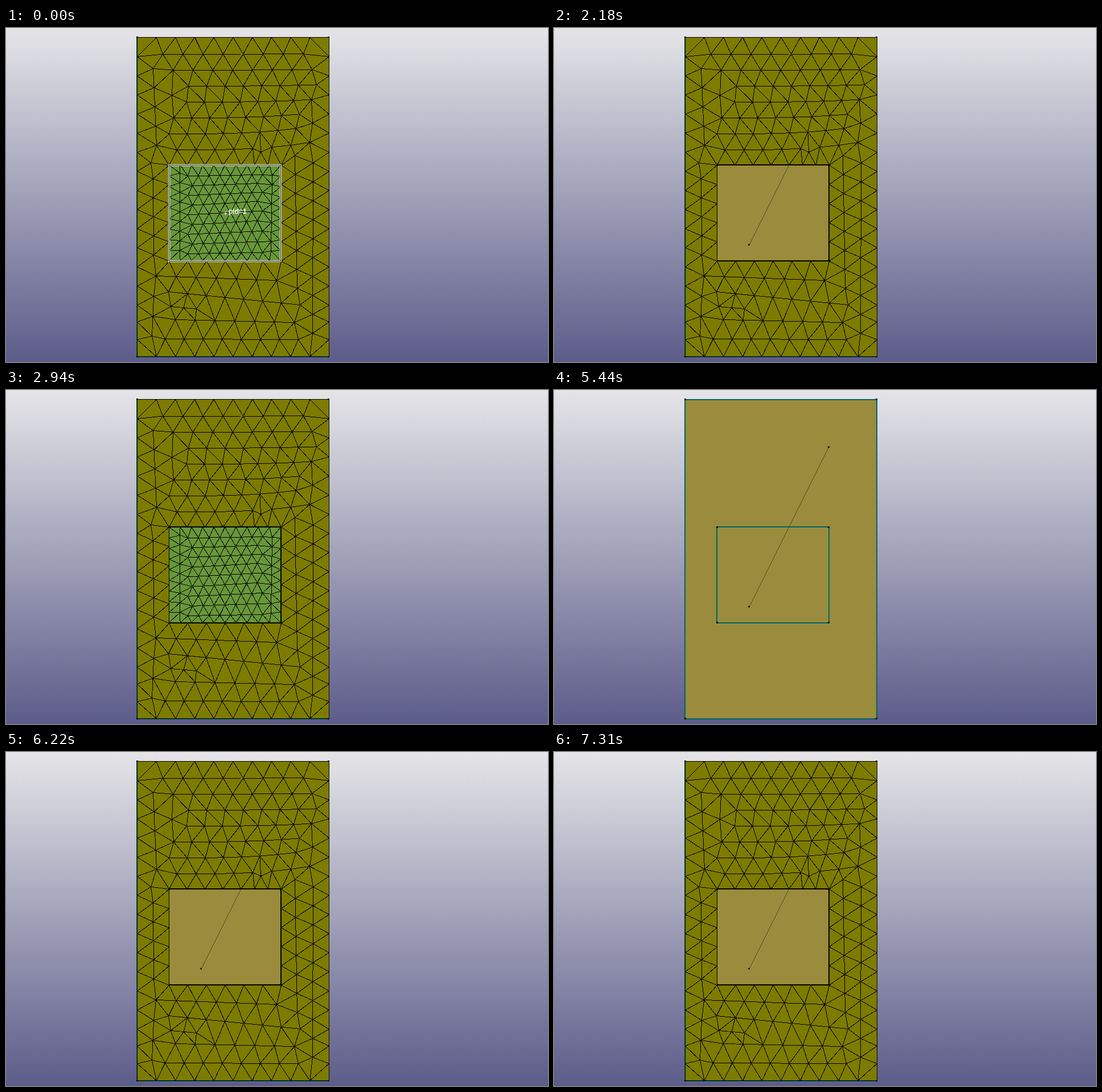
These frames come from a looping animation (952 px wide and 588 px high, 8000 ms). An HTML page:

```html
<!DOCTYPE html>
<html lang="en">
<head>
<meta charset="utf-8">
<title>Mesh parts</title>
<style>
  html, body { margin: 0; width: 100%; height: 100%; overflow: hidden; }
  svg { display: block; width: 952px; height: 588px; background: linear-gradient(#e5e5e8, #5c5c8a); }
  .wire { fill: none; stroke: #000; shape-rendering: crispEdges; }
  .edge { fill: none; stroke: #006466; stroke-width: 2; shape-rendering: crispEdges; }
  .white { stroke: #fff; }
  text { font: bold 12px "Liberation Sans", Arial, sans-serif; fill: #fff; }
</style>
</head>
<body>
<svg viewBox="0 0 952 588">
  <g id="geometry">
    <rect x="230" y="16" width="337" height="563" fill="#9a8c3c"/>
    <path d="M343 382L482.500 100.500" stroke="#4f4a1e"/>
    <rect class="edge" x="230" y="17" width="337" height="562"/>
    <rect class="edge" x="286" y="241" width="197" height="169"/>
  </g>
  <g id="plate">
    <path fill="#7d7b00" fill-rule="evenodd" d="M230 16H567V579H230ZM287 241V409H482V241Z"/>
    <path class="wire mesh"/>
    <rect class="wire" x="230.500" y="16.500" width="337" height="562"/>
    <path class="wire" d="M286.500 240.500V409.500H482.500V240.500Z"/>
  </g>
  <g id="block">
    <rect x="286" y="241" width="197" height="169" fill="#68973a"/>
    <path class="wire mesh"/>
    <rect class="wire" x="286.500" y="241.500" width="196" height="168"/>
  </g>
  <g id="label">
    <rect class="wire white" x="286.500" y="241.500" width="196" height="169" stroke-width="3"/>
    <rect class="wire" x="286.500" y="241.500" width="196" height="169"/>
    <path class="wire white" d="M382 326.500H388M385.500 323V329"/>
    <text x="391" y="327">pid=1</text>
  </g>
</svg>
<script>
const LOOP = 8000;
const $ = id => document.getElementById(id);

// n evenly spaced points from one end to the other; lift raises the far end smoothly
const row = (n, x0, y0, x1, y1, lift = 0) => Array.from({ length: n }, (_, i) => {
  const t = i / (n - 1);
  return [x0 + (x1 - x0) * t, y0 + (y1 - y0) * t - lift * t ** 3];
});
const rows = (n, make) => Array.from({ length: n }, (_, i) => make(i + 1)).flat();

function circle(pts, a, b, c) {
  const [ax, ay] = pts[a];
  const bx = pts[b][0] - ax, by = pts[b][1] - ay;
  const cx = pts[c][0] - ax, cy = pts[c][1] - ay;
  const d = 2 * (bx * cy - by * cx) || 1e-9;
  const bb = bx * bx + by * by, cc = cx * cx + cy * cy;
  const ux = (cy * bb - by * cc) / d, uy = (bx * cc - cx * bb) / d;
  return { v: [a, b, c], x: ax + ux, y: ay + uy, r: ux * ux + uy * uy };
}

const sides = v => v.map((a, k) => [a, v[(k + 1) % 3]].sort((p, q) => p - q).join());

// Incremental Delaunay triangulation; a tiny jitter avoids ties
function triangulate(nodes) {
  const n = nodes.length;
  const pts = nodes.map(([x, y], i) => [x + 0.02 * Math.sin(i * 12.9), y + 0.02 * Math.sin(i * 7.3 + 1)]);
  pts.push([-2e4, -2e4], [2e4, -2e4], [400, 3e4]);
  let tris = [circle(pts, n, n + 1, n + 2)];
  for (let i = 0; i < n; i++) {
    const [x, y] = pts[i], rim = new Set();
    tris = tris.filter(t => {
      if ((x - t.x) ** 2 + (y - t.y) ** 2 >= t.r) return true;
      for (const s of sides(t.v)) if (!rim.delete(s)) rim.add(s);
      return false;
    });
    for (const s of rim) tris.push(circle(pts, ...s.split(",").map(Number), i));
  }
  return tris.map(t => t.v).filter(v => v.every(i => i < n));
}

// Every edge is drawn once, so shared sides stay one pixel wide
function drawMesh(id, nodes, keep = () => true) {
  const mid = (v, axis) => v.reduce((sum, i) => sum + nodes[i][axis], 0) / 3;
  const edges = new Set(triangulate(nodes).filter(v => keep(mid(v, 0), mid(v, 1))).flatMap(sides));
  const at = i => nodes[i].map(c => (c + 0.5).toFixed(1)).join(" ");
  const d = [...edges].map(e => "M" + e.split(",").map(at).join("L")).join("");
  $(id).querySelector(".mesh").setAttribute("d", d);
}

const plateRim = [
  ...row(11, 230, 16, 567, 16), ...row(11, 230, 578, 567, 578),
  ...[230, 567].flatMap(x => [...row(14, x, 50, x, 487.5), ...row(2, x, 517, x, 548)]),
  ...row(5, 286, 241, 412, 241), ...row(3, 436, 241, 483, 241),
  ...row(7, 286, 410, 483, 410),
  ...[286, 483].flatMap(x => row(4, x, 275, x, 376))
];
const starts = [275, 293, 320, 317, 294, 286, 300];
const ends = [522, 537, 545, 536, 515, 509, 533];
const above = rows(7, k => {
  const y = 17.5 + 28.1 * k;
  return row(8, starts[k - 1], y, ends[k - 1], y, 0.27 * k * k);
});
const beside = [
  ...row(5, 258, 71, 264, 206), [291, 118], [538, 167], [447, 218], [254, 237],
  ...row(5, 258, 265, 259, 399),
  ...row(8, 507, 224, 511, 458), ...row(10, 539, 237, 538, 537)
];
const below = [
  ...row(7, 263, 436, 475, 444), ...row(8, 285, 464, 516, 487),
  ...row(3, 289, 490, 334, 494), ...row(7, 297, 513, 506, 518),
  ...row(8, 279, 547, 513, 548), ...row(3, 259, 472, 256, 542)
];
drawMesh("plate", [...plateRim, ...above, ...beside, ...below],
  (x, y) => x < 286 || x > 483 || y < 241 || y > 410);

drawMesh("block", [
  ...row(11, 286, 241, 482, 241), ...row(11, 286, 409, 482, 409),
  ...[286, 482].flatMap(x => row(8, x, 260, x, 391)),
  ...row(9, 305, 255, 305, 391), ...row(9, 467, 259, 465, 392),
  ...rows(9, k => {
    const odd = k % 2, y = 243 + 17.1 * k;
    return row(7 + odd, 327 - 8 * odd, y, 441 + 9 * odd, y - 7 * Math.sin(Math.PI * k / 10));
  })
]);

function dot(x, y, fill) {
  const r = document.createElementNS("http://www.w3.org/2000/svg", "rect");
  const a = { x: x - 1, y: y - 1, width: 3, height: 3, fill };
  for (const k in a) r.setAttribute(k, a[k]);
  $("geometry").append(r);
}
for (const x of [230, 566]) for (const y of [16, 578]) dot(x, y, "#1a0a0a");
for (const x of [286, 482]) for (const y of [241, 409]) dot(x, y, "#1a0a0a");
dot(482, 100, "#2a0606");
dot(342, 381, "#5a0a0a");

// Each part starts visible and toggles at the given times
function toggle(id, ...times) {
  const frames = [0, ...times].map((t, i) => ({ offset: t / LOOP, opacity: 1 - i % 2, easing: "steps(1, end)" }));
  frames.push({ offset: 1, opacity: 1 - times.length % 2 });
  $(id).animate(frames, { duration: LOOP, iterations: Infinity }).startTime = 0;
}
toggle("plate", 5440, 6220, 6830, 7310);
toggle("block", 2180, 2940, 4040);
toggle("label", 2180);
</script>
</body>
</html>
```
